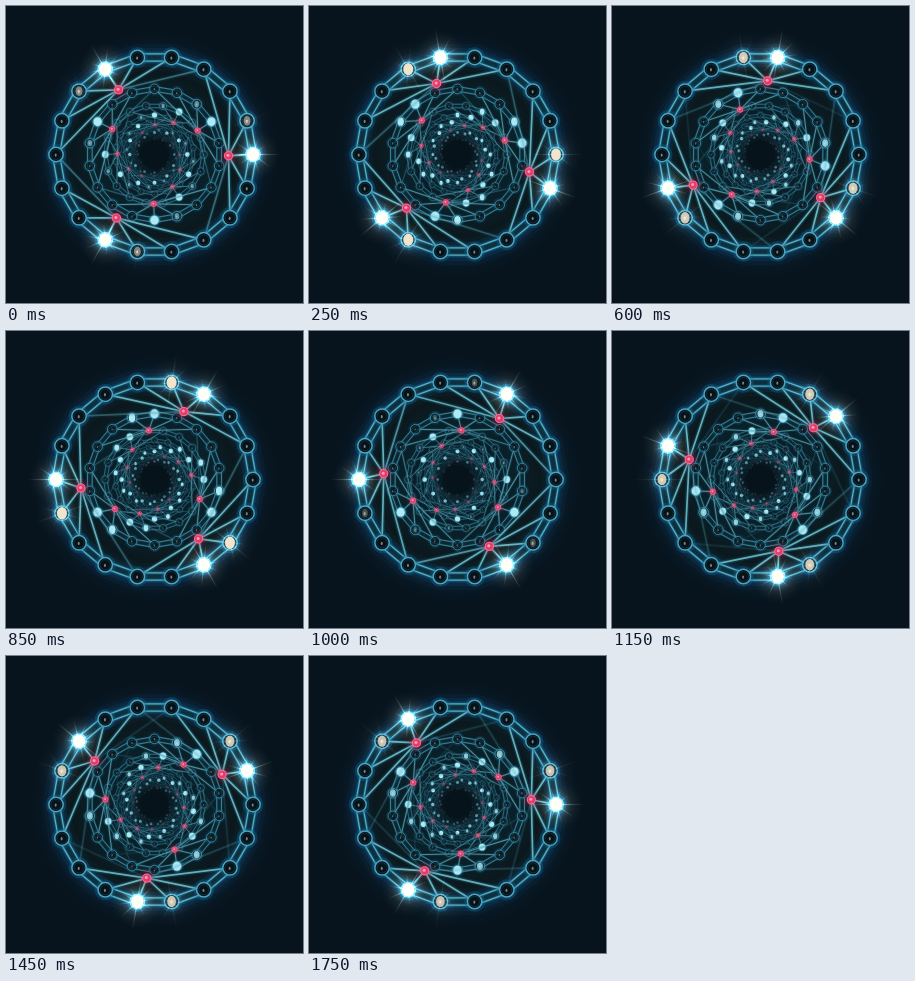
An HTML page with a canvas that plays this animation: 297x297 px, repeating every 1800 ms.

```html
<!DOCTYPE html>
<html lang="en">
<head>
<meta charset="utf-8">
<title>Ring tunnel</title>
<style>
html, body { margin: 0; width: 100%; height: 100%; overflow: hidden; background: #07141e; }
canvas { display: block; width: 297px; height: 297px; }
</style>
</head>
<body>
<canvas id="stage"></canvas>
<script>
const SIZE = 297, CENTER = 148.5, LOOP = 1800, STEP = 50;
const RING = 98.5, HUB = 74, LEVELS = 12, NODES = 18;
const RAD = Math.PI / 180;
// Hub rotation in degrees over one loop: [ms, angle]
const TURN = [[0, 1], [250, 13.6], [600, 35.6], [850, 53.4], [1150, 75.7], [1450, 96], [1750, 116.3], [1800, 121]];

const canvas = document.getElementById('stage');
const ctx = canvas.getContext('2d');
const ratio = window.devicePixelRatio || 1;
canvas.width = canvas.height = Math.round(SIZE * ratio);

const clamp = v => Math.max(0, Math.min(1, v));
const ramp = (from, to, v) => clamp((v - from) / (to - from));
const wrap = a => ((a + 180) % 360 + 360) % 360 - 180;
const polar = (r, deg) => [r * Math.cos(deg * RAD), r * Math.sin(deg * RAD)];

function hubAngle(t) {
  const i = TURN.findIndex(([end]) => end > t);
  const [t0, a0] = TURN[i - 1], [t1, a1] = TURN[i];
  return a0 + (a1 - a0) * (t - t0) / (t1 - t0);
}

function radial(x, y, r, stops) {
  const g = ctx.createRadialGradient(x, y, 0, x, y, r);
  stops.forEach(([at, color]) => g.addColorStop(at, color));
  ctx.fillStyle = g;
  ctx.beginPath();
  ctx.arc(x, y, r, 0, 7);
  ctx.fill();
}

function disc(x, y, rx, ry, color) {
  ctx.fillStyle = color;
  ctx.beginPath();
  ctx.ellipse(x, y, rx, ry, 0, 0, 7);
  ctx.fill();
}

function circle(x, y, r, width, color) {
  ctx.strokeStyle = color;
  ctx.lineWidth = width;
  ctx.beginPath();
  ctx.arc(x, y, r, 0, 7);
  ctx.stroke();
}

function polygon(r, phase, width, color) {
  ctx.beginPath();
  for (let i = 0; i < NODES; i++) ctx.lineTo(...polar(r, phase + i * 20));
  ctx.closePath();
  ctx.strokeStyle = color;
  ctx.lineWidth = width;
  ctx.stroke();
}

function line(a, b, width, color) {
  ctx.strokeStyle = color;
  ctx.lineWidth = width;
  ctx.beginPath();
  ctx.moveTo(...a);
  ctx.lineTo(...b);
  ctx.stroke();
}

// A node lights just ahead of its hub and fades behind it.
const brightness = d => d > 0 ? ramp(13, 7, d) : d > -8 ? 1 : d > -15 ? 1 - (-8 - d) * 0.06 : 0.58 * ramp(-29, -15, d);
const linkStrength = d => d > 0 ? ramp(66, 52, d) : ramp(-80, -63, d);

function drawLight(x, y, level, direction, depth) {
  const outer = depth === 0;
  ctx.save();
  ctx.translate(x, y);
  ctx.globalCompositeOperation = 'lighter';
  if (outer) {
    ctx.globalAlpha = level * level;
    radial(0, 0, 27, [[0, 'rgba(225,240,240,.75)'], [0.28, 'rgba(130,180,185,.4)'], [0.6, 'rgba(85,75,55,.2)'], [1, 'rgba(40,35,25,0)']]);
    for (let i = 0; i < 10; i++) {
      const length = i % 5 === 0 ? 29 : 15 + (i * 7) % 9;
      const end = polar(length, direction + i * 36);
      const g = ctx.createLinearGradient(0, 0, ...end);
      g.addColorStop(0, 'rgba(225,245,245,.5)');
      g.addColorStop(1, 'rgba(100,150,160,0)');
      line([0, 0], end, 1.2, g);
    }
  } else {
    ctx.globalAlpha = level * 0.7;
    radial(0, 0, 10, [[0, 'rgba(120,215,235,.7)'], [1, 'rgba(30,110,140,0)']]);
  }
  ctx.globalCompositeOperation = 'source-over';
  ctx.globalAlpha = clamp(level * 1.5);
  const core = 2 + 4.4 * level;
  disc(0, 0, core, Math.min(core + 1.3, 6.8), outer ? (level > 0.8 ? '#fdfff8' : '#f0e6cf') : '#aeeaf4');
  ctx.restore();
}

function drawHub(x, y) {
  radial(x, y, 11, [[0, 'rgba(240,50,105,.55)'], [0.45, 'rgba(190,40,85,.28)'], [1, 'rgba(130,20,60,0)']]);
  disc(x, y, 4.3, 4.3, '#e63b6c');
  circle(x, y, 4.1, 0.8, '#ff85a0');
  disc(x - 0.5, y - 0.5, 1.5, 1.5, '#ff9fb4');
}

function drawLevel(depth, angle) {
  const scale = 1 / (1 + depth / 2);
  const phase = -30 * depth;
  const fade = depth === 0 ? 1 : 0.72 * Math.pow(0.86, depth - 1);
  const hubs = [0, 120, 240].map(a => phase + angle + a);
  const nodes = Array.from({ length: NODES }, (_, i) => phase + i * 20);

  ctx.save();
  ctx.translate(CENTER, CENTER);
  ctx.scale(scale, scale);
  ctx.globalAlpha = fade;
  ctx.lineJoin = 'round';

  if (depth === 0) {
    [[27, 0.06], [19, 0.1], [13, 0.18]].forEach(([w, a]) => polygon(RING, phase, w, `rgba(20,105,165,${a})`));
  }
  polygon(RING, phase, 6, 'rgba(14,45,58,.8)');
  for (const offset of [-3.6, 3.6]) {
    polygon(RING + offset, phase, 3.2, 'rgba(30,130,170,.32)');
    polygon(RING + offset, phase, 1.3, '#58afc0');
  }

  for (const h of hubs) {
    for (const n of nodes) {
      const strength = linkStrength(wrap(n - h));
      if (!strength) continue;
      ctx.globalAlpha = fade * strength;
      const a = polar(HUB, h), b = polar(RING, n);
      line(a, b, 4.6, 'rgba(25,110,140,.28)');
      line(a, b, 1.7, '#65afb9');
    }
  }
  ctx.globalAlpha = fade;

  const lights = [];
  for (const n of nodes) {
    const [x, y] = polar(RING, n);
    circle(x, y, 8, 5, 'rgba(20,110,160,.3)');
    disc(x, y, 7.5, 7.5, '#07131b');
    circle(x, y, 7.2, 1.5, '#4ba5bd');
    circle(x, y, 5.1, 0.7, 'rgba(40,95,115,.5)');
    disc(x - 0.3, y + 0.6, 1, 1.7, 'rgba(185,210,205,.6)');
    const level = Math.max(...hubs.map(h => brightness(wrap(n - h))));
    if (level > 0) lights.push([x, y, level, n]);
  }
  lights.forEach(([x, y, level, n]) => {
    ctx.globalAlpha = fade;
    drawLight(x, y, level, n, depth);
  });

  ctx.globalAlpha = depth === 0 ? 1 : 0.9 * Math.pow(0.74, depth - 1);
  hubs.forEach(h => drawHub(...polar(HUB, h)));
  ctx.restore();
}

function draw(t) {
  const angle = hubAngle(t);
  ctx.setTransform(ratio, 0, 0, ratio, 0, 0);
  ctx.globalAlpha = 1;
  ctx.fillStyle = '#07141e';
  ctx.fillRect(0, 0, SIZE, SIZE);
  radial(CENTER, CENTER, 127, [[0, '#081820'], [0.45, '#0a2029'], [0.68, '#0b171b'], [0.8, '#0a2131'], [1, 'rgba(7,20,30,0)']]);
  for (let depth = LEVELS - 1; depth >= 0; depth--) drawLevel(depth, angle);
  radial(CENTER, CENTER, 27, [[0, '#07131b'], [0.5, '#07131b'], [1, 'rgba(7,20,28,0)']]);
}

const start = performance.now();
function tick() {
  const t = (performance.now() - start) % LOOP;
  draw(Math.floor(t / STEP) * STEP);
  requestAnimationFrame(tick);
}
tick();
</script>
</body>
</html>
```
